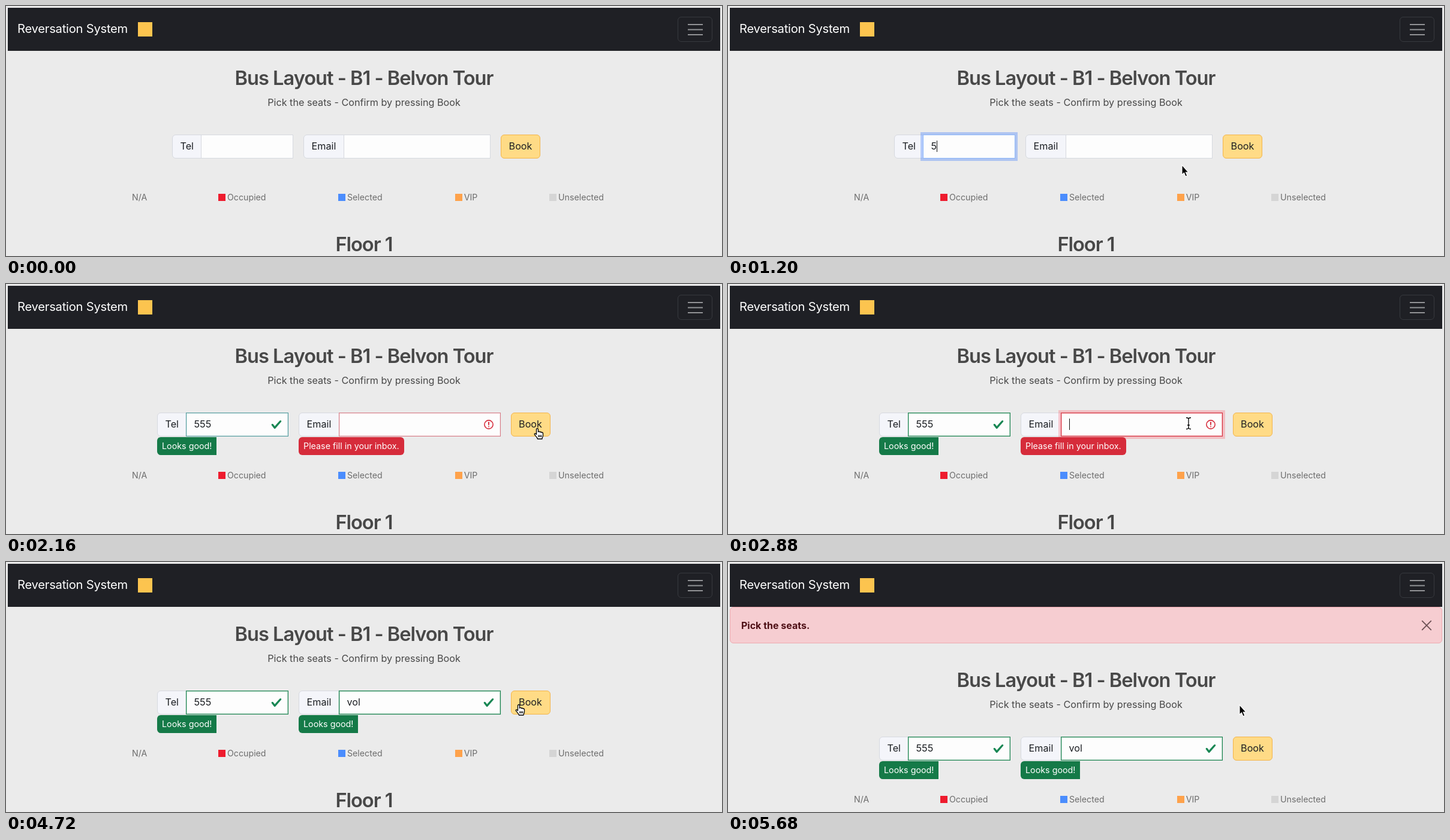
Write an HTML page that moves like this. It is 1194 by 418 pixels and loops after 5760 ms.

```html
<!DOCTYPE html>
<html lang="en">
<head>
<meta charset="utf-8">
<title>Bus booking form</title>
<style>
html, body { margin: 0; width: 100%; height: 100%; overflow: hidden; background: #ebebeb; }
body { position: relative; font: 16.2px/40px Inter, "Open Sans", sans-serif; font-optical-sizing: none; color: #1b1e22; }
div, svg { position: absolute; box-sizing: border-box; white-space: nowrap; }
svg { overflow: visible; }
#nav { left: 3px; top: 3px; width: 1188px; height: 72px; background: #1f2025; }
#brand { left: 19px; top: 17.5px; font-size: 20.2px; letter-spacing: -.012em; color: #fff; }
#mark { left: 220px; top: 27px; width: 24px; height: 24px; background: #fcc44f; }
#menu { left: 1120px; top: 18px; width: 58px; height: 42px; border: 1px solid #37393e; border-radius: 6px; }
#menu svg { left: 16px; top: 11px; }
#alert { left: 3px; top: 75px; width: 1188px; height: 60.5px; border: 1px solid #eea9b0; border-radius: 6px; background: #f6cdd1; }
#alert div { left: 18px; top: 9.5px; font-weight: 700; font-size: 16px; color: #4f1016; }
#alert svg { left: 1152.5px; top: 21.5px; }
#page { left: 0; top: 0; width: 1194px; height: 418px; }
.mid { left: 0; width: 1194px; text-align: center; color: #484848; }
.head { font-size: 32.6px; font-weight: 570; letter-spacing: -.031em; }
.key { top: 300px; font-size: 14.2px; color: #6d6d6d; }
.chip { top: 314px; width: 12px; height: 12px; }
.label, .input, #book { top: 215px; height: 39.5px; line-height: 37.5px; border: 1px solid #d6d9df; }
.label { border-radius: 6px 0 0 6px; background: #f4f5fa; padding-left: 12.5px; }
.input { background: #fdfdfd; padding-left: 12.5px; display: flex; align-items: center; }
.input i { width: 1px; height: 19px; background: #111; }
.input svg { top: 50%; transform: translate(50%, -50%); right: 19.5px; }
.tip { top: 256px; height: 30px; line-height: 30px; padding: 0 8px; font-size: 14.3px; color: #fff; }
#book { width: 66px; border-color: #f3b44a; border-radius: 6px; background: #ffdb86; text-align: center; }
</style>
</head>
<body>
<div id="nav"></div>
<div id="brand">Reversation System</div>
<div id="mark"></div>
<div id="menu"><svg width="25" height="18"><path d="M0 1H25M0 9.5H25M0 18H25" stroke="#929396" stroke-width="1.8"/></svg></div>
<div id="alert"><div>Pick the seats.</div><svg width="16" height="16"><path d="M.7.7 15.3 15.3M15.3.7.7 15.3" stroke="#6f5357" stroke-width="1.9" stroke-linecap="round"/></svg></div>
<div id="page">
  <div class="mid head" style="top:100px">Bus Layout - B1 - Belvon Tour</div>
  <div class="mid" style="top:140.8px">Pick the seats - Confirm by pressing Book</div>
  <div id="book">Book</div>
  <div class="mid head" style="top:378px">Floor 1</div>
</div>
<svg id="cursor" width="1" height="1">
  <path id="arrow" d="M0-1V15.2L3.5 12 6 18 8.8 16.8 6.3 11H10.8Z" fill="#000" stroke="#fff" stroke-width="1.1"/>
  <g id="hand" transform="translate(-4.5 -3)" stroke="#000" stroke-width="1.3" stroke-linejoin="round">
    <path fill="#fff" d="M5 11V3A1.5 1.5 0 0 1 8 3V7.5C8 6 11 6 11 8 11 6.8 13.6 7 13.6 8.6 13.8 7.6 16 7.8 16 9.8V13C16 16 14.5 16.5 14.5 19H7C6.5 16.5 3.5 14 2 11.8 1 9.8 3 9.2 5 11.5Z"/>
    <path fill="none" d="M8.5 12.5V16M10.8 12.5V16M13 12.5V16"/>
  </g>
  <g id="beam" fill="none">
    <path d="M-4-9.5Q0-9.5 0-7Q0-9.5 4-9.5M0-7V7M-4 9.5Q0 9.5 0 7Q0 9.5 4 9.5M-2 3H2" stroke="#fff" stroke-width="3"/>
    <path d="M-4-9.5Q0-9.5 0-7Q0-9.5 4-9.5M0-7V7M-4 9.5Q0 9.5 0 7Q0 9.5 4 9.5M-2 3H2" stroke="#000" stroke-width="1.3"/>
  </g>
</svg>
<script>
const LOOP = 5760, STEP = 80;
const SUBMIT = 2080, FIXED = 3360, ALERT = 4880, SHIFT = 77.4;
const GREY = [214, 217, 223], BLUE = [140, 182, 248], GREEN = [25, 130, 78], RED = [214, 44, 59];
const MOUSE = [
  [80, 600, 384], [560, 430, 236], [720, 430, 236], [1200, 756.5, 267], [1560, 756.5, 267],
  [1920, 884, 243], [2320, 884, 243], [2640, 768, 233], [4080, 768, 233], [4480, 852.5, 240]
];
const CHECK = '<svg width="19" height="19" viewBox="0 0 8 8"><path fill="#198754" d="M2.3 6.73.6 4.53c-.4-1.04.46-1.4 1.1-.8l1.1 1.4 3.4-3.8c.6-.63 1.6-.27 1.2.7l-4 4.6c-.43.5-.8.4-1.1.1z"/></svg>';
const WARN = '<svg width="19" height="19" viewBox="0 0 12 12" fill="none" stroke="#d62c3b"><circle cx="6" cy="6" r="4.5"/><path stroke-linejoin="round" d="M5.8 3.6h.4L6 6.5z"/><circle cx="6" cy="8.2" r=".6" fill="#d62c3b" stroke="none"/></svg>';

const $ = id => document.getElementById(id);
const smooth = p => p * p * (3 - 2 * p);
const ramp = (t, start) => smooth(Math.min(1, Math.max(0, (t - start) / 150)));
const mix = (a, b, p) => a.map((v, i) => v + (b[i] - v) * p);
const rgb = (c, alpha = 1) => `rgba(${c.map(Math.round)},${alpha})`;
const show = (el, on) => { el.style.display = on ? "" : "none"; };

function add(cls, css = {}, text = "", parent = $("page")) {
  const el = document.createElement("div");
  el.className = cls;
  el.textContent = text;
  Object.assign(el.style, css);
  parent.append(el);
  return el;
}

[["N/A", 210], ["Occupied", 369, 354, "#ee1c2e"], ["Selected", 569, 554, "#4b8dfd"],
 ["VIP", 763.7, 748.5, "#fea24b"], ["Unselected", 921, 905.5, "#d5d5d5"]].forEach(([name, x, chip, color]) => {
  add("key", { left: x + "px" }, name);
  if (color) add("chip", { left: chip + "px", background: color });
});

// x holds label left, input left and input right, before and after validation
function makeField(label, x, value, keys, focus, blur) {
  const f = { x, value, keys, focus, blur };
  f.label = add("label", {}, label);
  f.input = add("input");
  f.input.innerHTML = "<span></span><i></i>" + CHECK + WARN;
  [f.text, f.caret, f.check, f.warn] = f.input.children;
  f.tip = add("tip");
  return f;
}
const tel = makeField("Tel", [[277, 325, 479], [252, 300, 471]], "555", [1200, 1360, 1520], 640, 2000);
const email = makeField("Email", [[496, 563, 808], [488, 555, 825]], "vol", [3360, 3520, 3680], 2740, 4620);

function drawField(f, t) {
  const done = t >= SUBMIT;
  const bad = f === email && t < FIXED;
  const [a, b, c] = f.x[+done];
  f.label.style.left = f.tip.style.left = a + "px";
  f.label.style.width = b - a + 1 + "px";
  f.input.style.left = b + "px";
  f.input.style.width = c - b + "px";

  const typed = f.keys.filter(k => k <= t);
  f.text.textContent = f.value.slice(0, typed.length);
  const last = typed.length ? typed[typed.length - 1] : f.focus;
  show(f.caret, t >= f.focus && t < f.blur && (t - last) % 1000 < 500);

  const checked = ramp(t, SUBMIT);
  const lit = ramp(t, f.focus) * (1 - ramp(t, f.blur));
  let edge, halo;
  if (f === tel) {
    edge = mix(mix(GREY, BLUE, ramp(t, f.focus)), GREEN, checked);
    halo = rgb([45, 112, 250], .32 * lit);
  } else {
    const ok = ramp(t, FIXED);
    edge = mix(mix(GREY, RED, checked), GREEN, ok);
    halo = rgb(mix([255, 70, 85], GREEN, ok), .28 * lit);
  }
  f.input.style.borderColor = rgb(edge);
  f.input.style.boxShadow = `0 0 0 ${4 * lit}px ${halo}, inset 0 0 0 1px ${rgb(edge, .3 * checked)}`;

  show(f.check, done && !bad);
  show(f.warn, done && bad);
  show(f.tip, done);
  f.tip.textContent = bad ? "Please fill in your inbox." : "Looks good!";
  f.tip.style.background = bad ? "#d62c3b" : "#157a48";
  f.tip.style.borderRadius = bad ? "6px" : "6px 0 0 6px";
}

function mouseAt(t) {
  const i = MOUSE.findIndex(m => m[0] > t);
  if (i < 0) return MOUSE[MOUSE.length - 1].slice(1);
  if (i === 0) return MOUSE[0].slice(1);
  const [t0, ...p] = MOUSE[i - 1], [t1, ...q] = MOUSE[i];
  return mix(p, q, smooth((t - t0) / (t1 - t0)));
}

function drawCursor(t, bookX, shift) {
  const [x, y] = mouseAt(t);
  const inRow = y > 215 + shift && y < 254 + shift;
  const over = (l, r) => inRow && x > l && x < r;
  const state = +(t >= SUBMIT);
  const kind = over(bookX, bookX + 66) ? "hand"
    : [tel, email].some(f => over(f.x[state][1], f.x[state][2])) ? "beam" : "arrow";
  ["arrow", "hand", "beam"].forEach(id => show($(id), id === kind));
  show($("cursor"), t >= 80 && !(t >= FIXED && t < 4080));
  $("cursor").style.left = x + "px";
  $("cursor").style.top = y + "px";
}

function render(t) {
  const shift = t >= ALERT ? SHIFT : 0;
  const bookX = t >= SUBMIT ? 841.5 : 825;
  show($("alert"), t >= ALERT);
  $("page").style.top = shift + "px";
  $("book").style.left = bookX + "px";
  drawField(tel, t);
  drawField(email, t);
  drawCursor(t, bookX, shift);
}

const began = performance.now();
function tick() {
  const t = (performance.now() - began) % LOOP;
  render(Math.floor(t / STEP) * STEP);
  requestAnimationFrame(tick);
}
tick();
</script>
</body>
</html>
```
